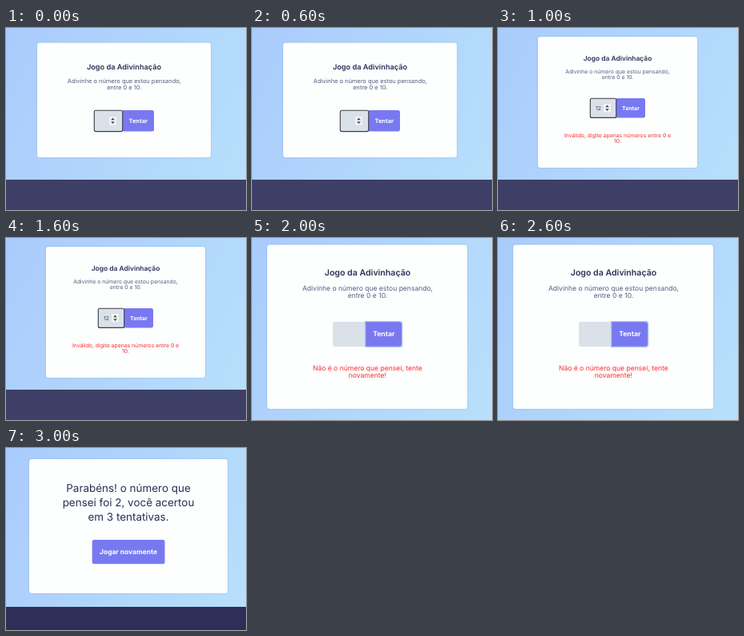
Recreate the animation shown at these times as an HTML page. Size 300 by 228 pixels, loop 4 s.

```html
<!DOCTYPE html>
<html lang="pt-BR">
<head>
<meta charset="utf-8">
<title>Jogo da Adivinhação</title>
<style>
  html, body { margin: 0; width: 100%; height: 100%; overflow: hidden; background: #b0d4fc; }
  svg { display: block; width: 100vw; height: 100vh; }
  text {
    font-family: Inter, "Open Sans", sans-serif;
    text-anchor: middle;
    text-rendering: geometricPrecision;
    fill: #5a5b80;
  }
  .scene { visibility: hidden; animation: show 4s step-end infinite; }
  .guess { animation-delay: -4s; }
  .invalid { animation-delay: -3s; }
  .wrong { animation-delay: -2s; }
  .won { animation-delay: -1s; }
  @keyframes show {
    0% { visibility: visible; }
    25%, 100% { visibility: hidden; }
  }
  .card { fill: #fdfefe; filter: drop-shadow(0 .6px 1px rgba(60, 90, 150, .22)); }
  .title { font-weight: 600; fill: #2e2f58; }
  .error { fill: #fb2a2f; }
  .field { fill: #dae1e9; }
  .focus { stroke: #3b3d46; stroke-width: 1.1; }
  .button { fill: #7879f1; }
  .ring { fill: none; stroke: #a9c2f6; stroke-width: 1.3; }
  .label { font-weight: 700; fill: #fff; }
  .value { fill: #3d3e60; }
  .message { fill: #2c2d56; }
  .footer { fill: #3e3f66; }
  .won .footer { fill: #2e2f58; }
</style>
</head>
<body>
<svg viewBox="0 0 300 228" preserveAspectRatio="none">
  <defs>
    <linearGradient id="sky" gradientUnits="userSpaceOnUse" x1="0" y1="30" x2="300" y2="190">
      <stop offset="0" stop-color="#aaccfc"/>
      <stop offset="1" stop-color="#b7dffb"/>
    </linearGradient>
    <g id="spinner">
      <rect width="9" height="10.5" rx="1" fill="#f1f2f3"/>
      <path d="M2.2 4.3 4.5 1.6 6.8 4.3ZM2.2 6.3 4.5 9 6.8 6.3Z" fill="#484a50"/>
    </g>
  </defs>
  <rect width="300" height="228" fill="url(#sky)"/>

  <g class="scene guess">
    <rect class="footer" y="190" width="300" height="38"/>
    <rect class="card" x="39" y="18.5" width="217" height="143.5" rx="3"/>
    <text class="title" x="147.5" y="52" font-size="9.2">Jogo da Adivinhação</text>
    <g font-size="7.45">
      <text x="147.8" y="69.2">Adivinhe o número que estou pensando,</text>
      <text x="147.8" y="76.7">entre 0 e 10.</text>
    </g>
    <path class="button" d="M146 103h36.5a2.5 2.5 0 0 1 2.5 2.5v21.5a2.5 2.5 0 0 1-2.5 2.5H146Z"/>
    <rect class="field focus" x="110.3" y="103.2" width="35.4" height="26.4" rx="2"/>
    <use href="#spinner" x="129" y="111"/>
    <text class="label" x="165.3" y="118.7" font-size="7.4">Tentar</text>
  </g>

  <g class="scene invalid">
    <rect class="footer" y="190" width="300" height="38"/>
    <rect class="card" x="50" y="11" width="199" height="164" rx="3"/>
    <text class="title" x="149.5" y="41.3" font-size="8.45">Jogo da Adivinhação</text>
    <g font-size="6.85">
      <text x="149.5" y="57.3">Adivinhe o número que estou pensando,</text>
      <text x="149.5" y="64.3">entre 0 e 10.</text>
      <text class="error" x="149.5" y="137">Inválido, digite apenas números entre 0 e</text>
      <text class="error" x="149.5" y="144">10.</text>
    </g>
    <path class="button" d="M148 88h33.5a2.5 2.5 0 0 1 2.5 2.5v19.5a2.5 2.5 0 0 1-2.5 2.5H148Z"/>
    <rect class="field focus" x="115.3" y="88.2" width="32.4" height="24.2" rx="2"/>
    <text class="value" x="125.4" y="102.7" font-size="6.9">12</text>
    <use href="#spinner" x="132" y="95"/>
    <text class="label" x="166" y="102.7" font-size="6.9">Tentar</text>
  </g>

  <g class="scene wrong">
    <rect class="card" x="19" y="8.5" width="250" height="205.5" rx="3.5"/>
    <text class="title" x="144.5" y="46.7" font-size="10.6">Jogo da Adivinhação</text>
    <g font-size="8.55">
      <text x="144.5" y="66.3">Adivinhe o número que estou pensando,</text>
      <text x="144.5" y="75.2">entre 0 e 10.</text>
      <text class="error" x="144.3" y="166.3">Não é o número que pensei, tente</text>
      <text class="error" x="144.3" y="175">novamente!</text>
    </g>
    <path class="field" d="M142 105h-38.5a2.5 2.5 0 0 0-2.5 2.5v26a2.5 2.5 0 0 0 2.5 2.5H142Z"/>
    <path class="button" d="M142 105h42.5a2.5 2.5 0 0 1 2.5 2.5v26a2.5 2.5 0 0 1-2.5 2.5H142Z"/>
    <path class="ring" d="M141.6 104.6h43a3 3 0 0 1 3 3v25.800a3 3 0 0 1-3 3h-43Z"/>
    <text class="label" x="164.8" y="123.4" font-size="8.6">Tentar</text>
  </g>

  <g class="scene won">
    <rect class="footer" y="199" width="300" height="29"/>
    <rect class="card" x="29" y="14" width="248" height="168" rx="3.5"/>
    <g class="lines" font-size="13.45">
      <text class="message" x="153" y="55.2">Parabéns! o número que</text>
      <text class="message" x="153" y="73.3">pensei foi 2, você acertou</text>
      <text class="message" x="153" y="91.4">em 3 tentativas.</text>
    </g>
    <rect class="button" x="107.7" y="115" width="90.8" height="30.3" rx="2.5"/>
    <text class="label" x="153" y="133" font-size="8.45">Jogar novamente</text>
  </g>
</svg>
</body>
</html>
```
